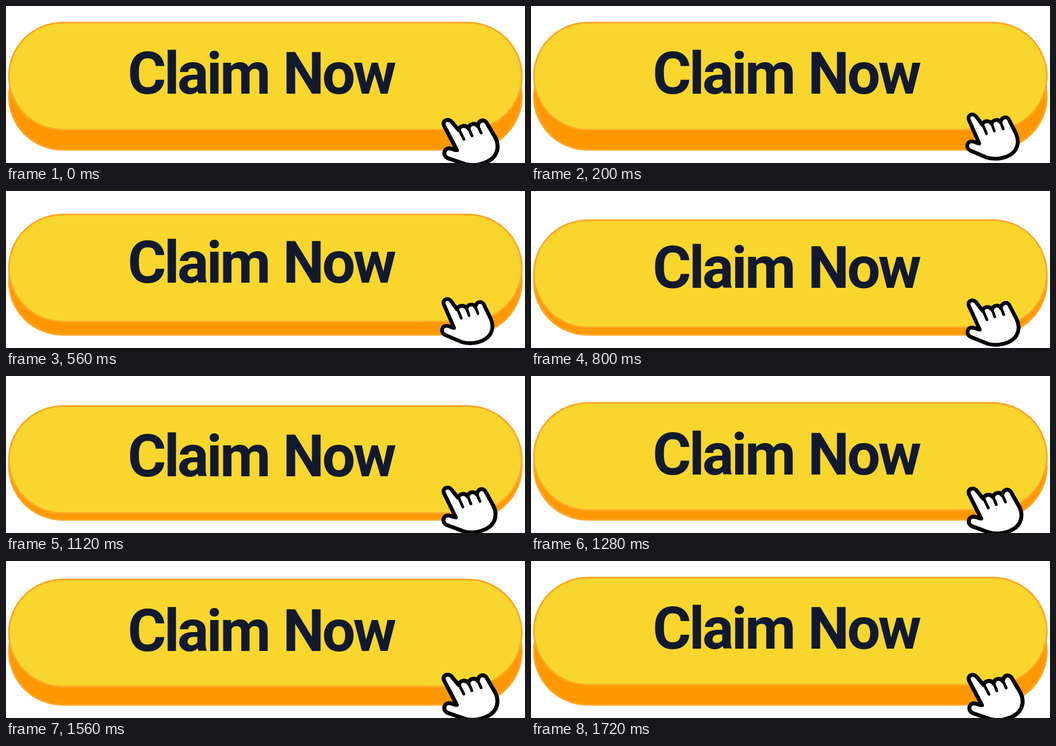
Write an HTML page that moves like this. It is 900 by 274 pixels and loops after 2 s.

```html
<!DOCTYPE html>
<html lang="en">
<head>
<meta charset="utf-8">
<title>Claim Now</title>
<style>
  html, body { margin: 0; width: 100%; height: 100%; overflow: hidden; background: #fff; }
  svg { display: block; width: 100vw; height: 100vh; }
  .pill { stroke: #ffa726; stroke-width: 3; }
  text { font: 700 102px Roboto, "Open Sans", sans-serif; letter-spacing: -3.9px; fill: #12192c; }
  #hand path { stroke: #000; stroke-width: 7; stroke-linejoin: round; stroke-linecap: round; }
</style>
</head>
<body>
<svg viewBox="0 0 900 274">
  <rect class="pill" x="5" y="64" width="889.5" height="187" rx="93.5" fill="#ff9800"/>
  <rect id="face" class="pill" x="5" y="29" width="889.5" height="187" rx="93.5" fill="#f9d62e"/>
  <g id="label">
    <text x="211" y="153">Claim</text>
    <text x="480" y="153">Now</text>
  </g>
  <g id="hand">
    <path fill="#fff" d="M782 251 L760 209 C755 199 768 194 774 203 L785 216
      C787 208 797 206 802 213 C804 204 814 203 818 209 C820 197 831 196 835 206
      L848 228 C856 243 853 259 840 268 C828 276 812 279 798 276
      L766 265 C757 261 759 248 768 248 C774 248 777 251 782 251 Z"/>
    <path fill="none" style="stroke-width:5" d="M785 214 L794 232 M802 212 L808 226 M818 208 L824 221"/>
  </g>
</svg>
<script>
  const LOOP = 2000, STEP = 40, END = 1720;
  const [face, label, hand] = ["face", "label", "hand"].map(id => document.getElementById(id));

  // Sine ease from 0 to 1 between two times
  const ease = (t, from, to) => {
    const u = Math.min(1, Math.max(0, (t - from) / (to - from)));
    return (1 - Math.cos(Math.PI * u)) / 2;
  };
  // Rise over a..b, fall over c..END
  const pulse = (t, a, b, c) => ease(t, a, b) - ease(t, c, END);

  function draw(t) {
    face.setAttribute("transform", `translate(0 ${24 * pulse(t, 170, 950, 1060)})`);
    label.setAttribute("transform", `translate(0 ${22 * pulse(t, 200, 1130, 1130)})`);
    const k = pulse(t, 0, 280, 220);
    hand.setAttribute("transform",
      `translate(767 ${195.5 - 11.3 * k}) rotate(${5 * k}) scale(${1 - 0.07 * k}) translate(-767 -195)`);
  }

  const start = performance.now();
  function tick() {
    const t = (performance.now() - start) % LOOP;
    draw(Math.floor(t / STEP) * STEP);
    requestAnimationFrame(tick);
  }
  tick();
</script>
</body>
</html>
```
